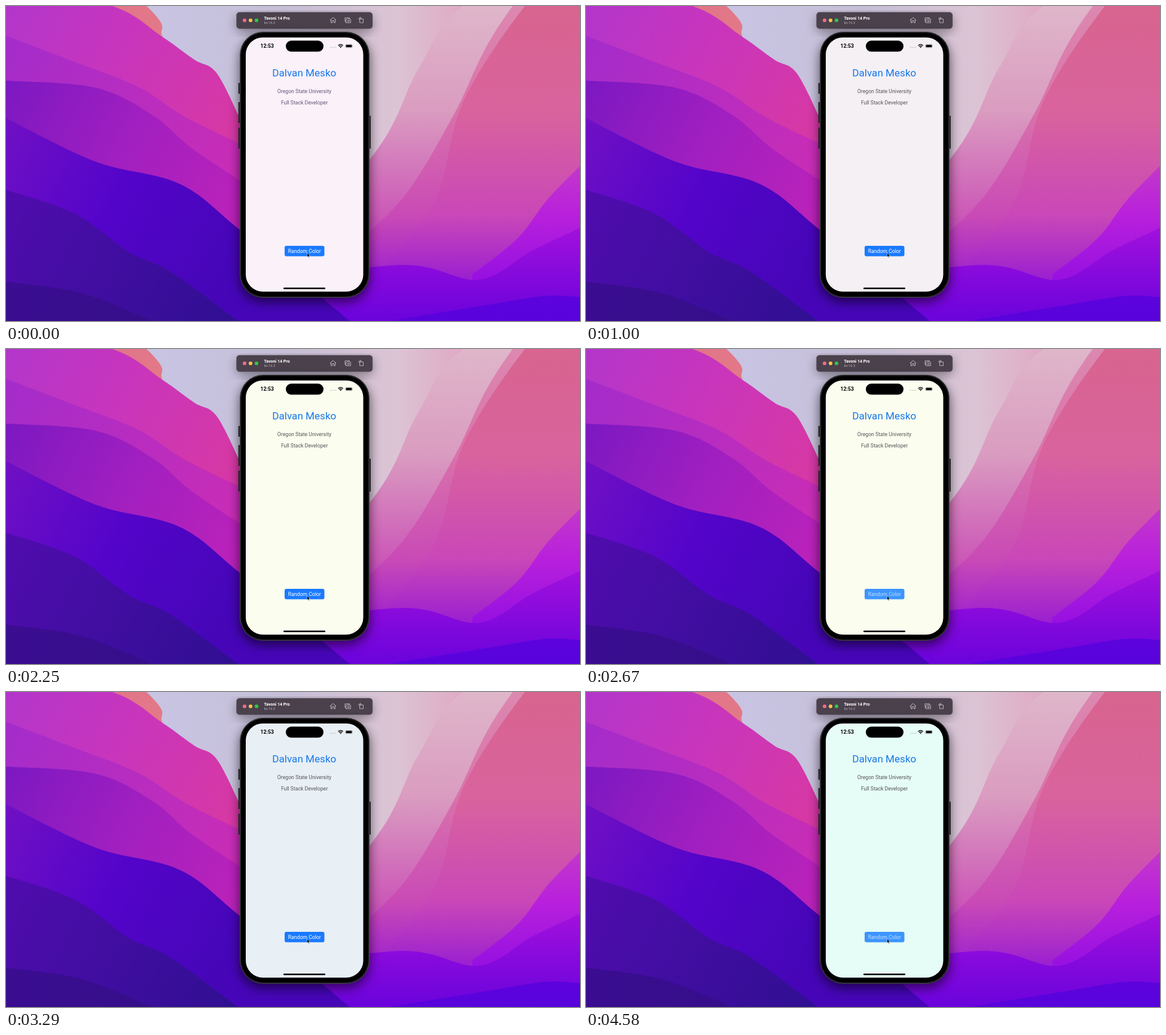
An HTML page for the animation above (4630 ms loop, 960x528 px).

```html
<!DOCTYPE html>
<html lang="en">
<head>
<meta charset="utf-8">
<title>Random Color</title>
<style>
  html, body { margin: 0; width: 100%; height: 100%; overflow: hidden; background: #4a08b8; }
  svg { display: block; width: 960px; height: 528px; font-family: Roboto, sans-serif; }
  .mid { text-anchor: middle; font-size: 8.7px; }
  .icon { fill: none; stroke: #d0ccd2; stroke-width: .8; stroke-linejoin: round; stroke-linecap: round; }
</style>
</head>
<body>
<svg viewBox="0 0 960 528">
  <defs>
    <filter id="blur" x="-30%" y="-30%" width="160%" height="160%"><feGaussianBlur stdDeviation="9"/></filter>
    <linearGradient id="sky">
      <stop offset=".25" stop-color="#c8c4e3"/><stop offset=".5" stop-color="#c6bfd6"/>
      <stop offset=".68" stop-color="#dcc4d4"/><stop offset=".8" stop-color="#e0a8c4"/>
    </linearGradient>
  </defs>
  <rect width="960" height="528" fill="url(#sky)"/>
  <g id="wallpaper"></g>

  <!-- window bar -->
  <rect x="386" y="16" width="227" height="27" rx="6" opacity=".4" filter="url(#blur)"/>
  <rect x="385.5" y="10.5" width="227.5" height="27.5" rx="5" fill="#4b414c" stroke="#5f5560" stroke-width=".5"/>
  <circle cx="399" cy="24" r="3.1" fill="#ee6a8c"/>
  <circle cx="409" cy="24" r="3.1" fill="#f5bf4f"/>
  <circle cx="419" cy="24" r="3.1" fill="#2fc644"/>
  <text x="431.5" y="23" font-size="7" font-weight="700" fill="#fff">Tavoni 14 Pro</text>
  <text x="431.5" y="30" font-size="5.7" fill="#b9b2ba">Ilo 16.2</text>
  <g class="icon">
    <path d="M542 23.7l5-4.4l5 4.4M543.5 22.7V28h2.2v-3.5h2.6V28h2.2v-5.3"/>
    <path d="M568.6 26H567v-6.2h7.5V21M568.8 22.2h1.6l.8-1h2.8l.8 1h1.6V28h-7.6z"/>
    <circle cx="572.6" cy="25" r="1.5"/>
    <path d="M592 21.8h5.5V28H592zM590.3 22.5v-2.3H594m-1.4-1.4l1.4 1.4l-1.4 1.4"/>
  </g>

  <!-- phone -->
  <rect x="390" y="50" width="219" height="447" rx="40" opacity=".55" filter="url(#blur)"/>
  <path d="M389.8 129v18M389.8 161v35M389.8 204v35M608.8 184v55" stroke="#222125" stroke-width="2.4"/>
  <rect x="391.5" y="43.5" width="216" height="445" rx="38.5" fill="#19191b" stroke="#454448"/>
  <rect x="393.6" y="45.6" width="211.8" height="440.8" rx="36.5"/>
  <rect id="screen" x="401" y="52.7" width="196.5" height="426" rx="28.5"/>
  <rect x="468" y="58" width="63" height="18.6" rx="9.3"/>
  <text x="436.8" y="70.3" font-size="8.7" font-weight="700" text-anchor="middle">12:53</text>
  <path d="M542.8 69.2h10" stroke="#aaa" stroke-width="1.4" stroke-linecap="round" stroke-dasharray="0 2.9"/>
  <path d="M555.5 66.2q4.1-3.6 8.2 0M557 68q2.6-2.2 5.2 0" fill="none" stroke="#000" stroke-width="1.3"/>
  <circle cx="559.6" cy="69.3" r="1"/>
  <rect x="567.8" y="64.5" width="11.4" height="5.4" rx="1.6" fill="none" stroke="#777" stroke-width=".6"/>
  <rect x="568.6" y="65.3" width="9.8" height="3.8" rx="1"/>

  <text class="mid" x="498.8" y="118" style="font-size:17.1px" fill="#1677ec">Dalvan Mesko</text>
  <g id="labels">
    <text class="mid" x="499" y="146.3">Oregon State University</text>
    <text class="mid" x="499" y="165.4">Full Stack Developer</text>
  </g>
  <rect id="button" x="466" y="402" width="66.5" height="17.6" rx="3"/>
  <text id="caption" class="mid" x="499.2" y="414">Random Color</text>
  <path d="M503.6 413.6v7.2l1.6-1.4l1.1 2.4l1.1-.5l-1.1-2.3h2.1z" stroke="#fff" stroke-width=".5"/>
  <rect x="464" y="471.9" width="70" height="2.6" rx="1.3"/>
</svg>

<script>
const byId = id => document.getElementById(id);

// Smooth curve through key points, closed along the bottom of the stage.
function slope(points) {
  const at = i => points[Math.max(0, Math.min(points.length - 1, i))];
  const parts = points.slice(1).map((end, i) => {
    const start = at(i), before = at(i - 1), after = at(i + 2);
    return `C${start.map((v, k) => v + (end[k] - before[k]) / 6)} ${end.map((v, k) => v - (after[k] - start[k]) / 6)} ${end}`;
  });
  return `M${points[0]}${parts.join("")}V528H${points[0][0]}Z`;
}

// Left slopes shade diagonally from their first point, right ones from top to bottom.
function ridge(colors, ...points) {
  const group = byId("wallpaper"), [x, y] = points[0], id = "shade" + group.children.length;
  const axis = x ? 'x1="0" y1="0" x2="0" y2="528"' : `x1="0" y1="${y}" x2="390" y2="${y + 200}"`;
  const stops = colors.map((c, i) => `<stop offset="${i / (colors.length - 1)}" stop-color="${c}"/>`).join("");
  group.innerHTML += `<linearGradient id="${id}" gradientUnits="userSpaceOnUse" ${axis}>${stops}</linearGradient>
    <path d="${slope(points)}" fill="url(#${id})"/>`;
}

// right side
ridge(["#dfb6ca", "#da9cc0", "#cc58b8", "#8006e0"], [390, 480], [610, 255], [690, 105], [765, 0], [960, -90]);
ridge(["#dc88b0", "#d972ab", "#c94ab6", "#8006e0"], [560, 420], [665, 320], [750, 180], [820, 40], [960, -150]);
ridge(["#d8648f", "#d9639d", "#c947b8", "#7c06e0"], [640, 430], [720, 320], [765, 160], [868, 0], [960, -90]);
ridge(["#d860a0", "#d050b8", "#b820dc", "#8006e4"], [780, 450], [855, 390], [905, 325], [960, 268]);
ridge(["#d040c0", "#c030d0", "#a812dc", "#6a03dc"], [390, 470], [660, 434], [790, 459], [880, 410], [960, 372]);
ridge(["#9010e8", "#5802dc"], [640, 528], [800, 502], [900, 486], [960, 488]);

// left side
ridge(["#dc6c92", "#e47c84"], [0, -200], [235, 0], [262, 52], [290, 110]);
ridge(["#b036cc", "#c835bd", "#d638a5"], [0, -40], [178, 0], [262, 52], [315, 90], [352, 112], [392, 190]);
ridge(["#a42ccb", "#c82db6"], [0, 50], [110, 92], [220, 135], [300, 186], [400, 235]);
ridge(["#7c18c2", "#a01fc0", "#ba22ba"], [0, 125], [150, 137], [245, 183], [310, 238], [400, 298]);
ridge(["#7010c4", "#5404ca", "#4606b8"], [0, 188], [150, 261], [290, 298], [392, 376], [575, 528]);
ridge(["#500cae", "#300f92"], [0, 308], [115, 348], [205, 412], [275, 445], [388, 528]);
ridge(["#3b0d91", "#300f84"], [0, 462], [125, 481], [245, 528]);

// Taps come at a steady pace; each release brings the next background.
const LOOP = 4630, FIRST_TAP = 720, PERIOD = 960, PRESS = 100;
const backgrounds = ["#fbf1f9", "#f5f0f4", "#fbfdef", "#e8eff5", "#e6fcf6"];

function draw(now) {
  const sinceTap = now % LOOP - FIRST_TAP + PERIOD;
  const pressed = sinceTap % PERIOD < PRESS;
  const step = Math.floor((sinceTap - PRESS) / PERIOD);
  byId("screen").setAttribute("fill", backgrounds[step]);
  byId("labels").setAttribute("fill", step ? "#555557" : "#62577a");
  byId("button").setAttribute("fill", pressed ? "#3d95ff" : "#1a7aff");
  byId("caption").setAttribute("fill", pressed ? "#c4dfff" : "#fff");
  requestAnimationFrame(draw);
}
draw(0);
</script>
</body>
</html>
```
